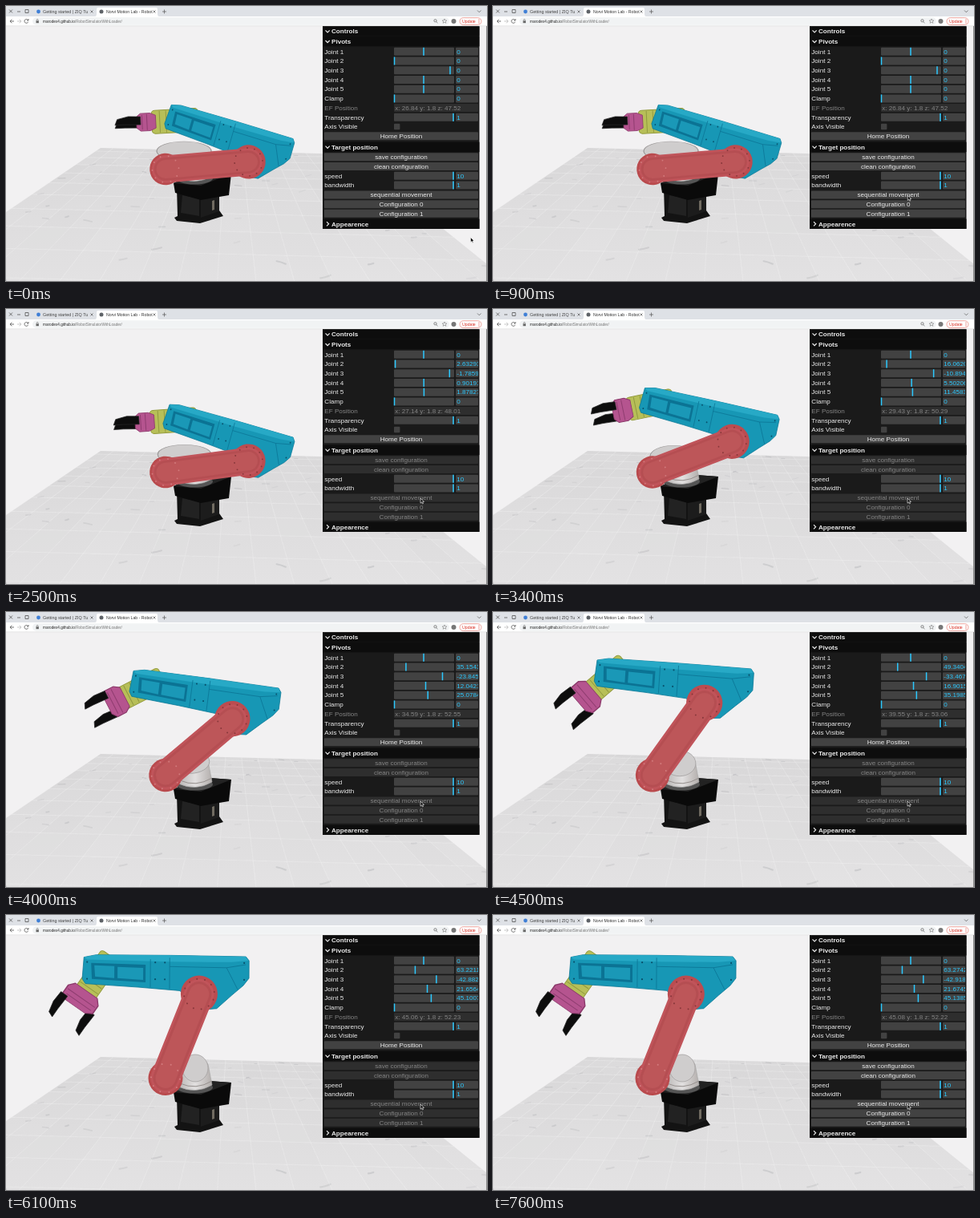
Recreate the animation shown at these times as an HTML page. Size 600 by 343 pixels, loop 7.7 s.

```html
<!DOCTYPE html>
<html lang="en">
<head>
<meta charset="utf-8">
<title>Robot arm simulator</title>
<style>
html, body { margin: 0; width: 100%; height: 100%; overflow: hidden; background: #f2f1f2; }
svg { display: block; width: 600px; height: 343px; }
text { font-family: "Liberation Sans", Arial, sans-serif; white-space: pre; }
</style>
</head>
<body>
<svg id="stage" viewBox="0 0 600 343" xmlns="http://www.w3.org/2000/svg">
  <defs>
    <linearGradient id="ground" x1="0" y1="0" x2="0" y2="1">
      <stop offset="0" stop-color="#dbdadb"/><stop offset="1" stop-color="#e4e3e4"/>
    </linearGradient>
    <linearGradient id="metal">
      <stop offset="0" stop-color="#b9b6b5"/><stop offset=".5" stop-color="#e2e0e0"/><stop offset="1" stop-color="#b3aeac"/>
    </linearGradient>
    <clipPath id="floorClip"><path d="M0 257L118 177L430 185L600 322V343H0Z"/></clipPath>
    <clipPath id="numberClip"><rect x="561" y="40" width="28" height="240"/></clipPath>
  </defs>
</svg>
<script>
const stage = document.getElementById('stage');
const LOOP = 7700, MOVE_START = 1412, MOVE_TIME = 4984, MAX_ANGLE = 63.2742;

function add(parent, tag, attrs, text) {
  const el = document.createElementNS('http://www.w3.org/2000/svg', tag);
  for (const key in attrs) el.setAttribute(key, attrs[key]);
  if (text !== undefined) el.textContent = text;
  parent.appendChild(el);
  return el;
}
const group = (parent, attrs = {}) => add(parent, 'g', attrs);
const rect = (parent, x, y, width, height, fill, more = {}) =>
  add(parent, 'rect', { x, y, width, height, fill, ...more });
const path = (parent, d, fill, more = {}) => add(parent, 'path', { d, fill, ...more });
const line = (parent, d, stroke, width, more = {}) =>
  path(parent, d, 'none', { stroke, 'stroke-width': width, ...more });
const circle = (parent, cx, cy, r, fill, more = {}) =>
  add(parent, 'circle', { cx, cy, r, fill, ...more });
const ellipse = (parent, cx, cy, rx, ry, fill, more = {}) =>
  add(parent, 'ellipse', { cx, cy, rx, ry, fill, ...more });
const label = (parent, x, y, text, size, fill, more = {}) =>
  add(parent, 'text', { x, y, 'font-size': size, fill, ...more }, text);
const place = (el, transform) => el.setAttribute('transform', transform);

function seededRandom(seed) {
  return () => (seed = (seed * 16807) % 2147483647) / 2147483647;
}

function drawFloor() {
  rect(stage, 0, 25, 600, 318, '#f2f1f2');
  const floor = group(stage, { 'clip-path': 'url(#floorClip)' });
  rect(floor, 0, 170, 600, 173, 'url(#ground)');
  const random = seededRandom(41), columns = 16, step = 312 / columns, depth = 0.06;
  const project = (u, z) => [281 + u / z, 66 + 112 / z + u / z * 0.025];
  for (let i = 0; i < 12; i++) {
    for (let j = -1; j <= columns; j++) {
      const u = -163 + j * step, z = 1 - i * depth;
      const corners = [project(u, z), project(u + step, z),
        project(u + step, z - depth), project(u, z - depth)];
      path(floor, 'M' + corners.join('L') + 'Z', `rgba(110,110,115,${0.03 * random()})`,
        { stroke: 'rgba(245,245,245,.3)', 'stroke-width': 0.5 });
      if (random() < 0.35) {
        const [x, y] = project(u + step * random(), z - depth * random());
        const size = (2 + 5 * random()) / z, tilt = (random() - 0.5) * size;
        line(floor, `M${x} ${y}q${size * 0.4} ${tilt * 0.1} ${size} ${tilt * 0.7}`,
          `rgba(105,108,115,${0.05 + random() * 0.13})`, 1 / z, { 'stroke-linecap': 'round' });
      }
    }
  }
}

function drawBrowser() {
  rect(stage, 0, 0, 600, 14, '#dee1e6');
  rect(stage, 0, 13, 600, 12, '#fff');
  rect(stage, 0, 24.6, 600, 0.6, '#d5d5d5');
  path(stage, 'M110 13.5Q113 13 113 10V4Q113 2 115 2H187Q189 2 189 4V10Q189 13 192 13.5Z', '#fff');
  line(stage, 'M4 4.5l4 4m0-4l-4 4M14 7h4M24 4.5h4v4h-4z', '#555', 0.8);
  line(stage, 'M105.5 5.5l3 3m0-3l-3 3M183.5 5.5l3 3m0-3l-3 3M195 7h5M197.5 4.5v5M588 5.5l2.3 2.3 2.3-2.3', '#555', 0.7);
  circle(stage, 40.5, 7, 2.4, '#3f7fd6');
  circle(stage, 119, 7, 2.5, '#5f6368');
  label(stage, 46, 9.2, 'Getting started | ZIQ Tu', 5.4, '#444');
  label(stage, 125, 9.2, 'Norvi Motion Lab - Robot', 5.2, '#333');
  line(stage, 'M10 19H5m2.3-2.3L5 19l2.3 2.3', '#555', 0.8);
  line(stage, 'M14 19h5m-2.3-2.3L19 19l-2.3 2.3', '#bbb', 0.8);
  line(stage, 'M27.5 17.7a2.4 2.4 0 1 0 .2 2M28 16v2h-2', '#555', 0.8);
  rect(stage, 33, 14.3, 520, 9.4, '#f1f3f4', { rx: 4.7 });
  rect(stage, 37.5, 18.4, 3.4, 2.8, '#666');
  line(stage, 'M38.2 18.5v-1a1 1 0 0 1 2 0v1', '#666', 0.6);
  const url = label(stage, 46, 20.5, '', 4.7, '#777');
  add(url, 'tspan', { fill: '#222' }, 'marodex4.github.io');
  add(url, 'tspan', {}, '/RobotSimulatorWithLoader/');
  circle(stage, 535.5, 18.3, 1.6, 'none', { stroke: '#555', 'stroke-width': 0.7 });
  line(stage, 'M536.7 19.5l1.7 1.7', '#555', 0.7);
  line(stage, 'M547 16l.9 2h2l-1.6 1.3.6 2-1.9-1.2-1.9 1.2.6-2-1.6-1.3h2z', '#666', 0.5);
  circle(stage, 558.5, 19, 3, '#777');
  rect(stage, 566, 14.7, 27, 8.8, '#fff', { rx: 4.4, stroke: '#e0685f', 'stroke-width': 0.6 });
  label(stage, 569, 20.9, 'Update', 5.2, '#d93025');
  [17, 19, 21].forEach(y => circle(stage, 590, y, 0.6, '#d93025'));
  rect(stage, 599, 25, 1, 318, '#8b8b8b');
}

function boltRing(parent, cx, cy, r, count, fill) {
  for (let i = 0; i < count; i++) {
    const a = i / count * Math.PI * 2;
    circle(parent, cx + r * Math.cos(a), cy + r * Math.sin(a), 1, fill);
  }
}

function drawBase() {
  path(stage, 'M213 226L214 262L210 264L213 268L242 271L271 262L266 255V226Z', '#131313');
  path(stage, 'M220 236L241 240V262L218 258Z', '#222');
  path(stage, 'M243 240L266 234V256L243 264Z', '#1c1c1c');
  path(stage, 'M257 243l3-1v12l-3 1z', '#706b61');
  path(stage, 'M209 221L241 206L281 209L278 236L243 242L211 233Z', '#0a0a0a');
  path(stage, 'M209 221L241 206L281 209L243 224Z', '#222');
  ellipse(stage, 235, 215, 23, 7.5, '#555');
  path(stage, 'M215 214Q218 186 229 177Q243 171 252 186L257 212Q237 224 215 214Z', 'url(#metal)',
    { stroke: '#aaa', 'stroke-width': 0.7 });
  line(stage, 'M217 210Q237 219 257 207M228 186Q240 178 250 190', '#96908e', 1);
}

// Motor housing that turns out of sight behind the lower arm.
function drawHousing() {
  const body = ellipse(stage, 0, 0, 1, 1, '#cfcdcd', { stroke: '#9d9a9a', 'stroke-width': 0.04 });
  return s => place(body, `translate(${222 + 14 * s} ${181 + 10 * s}) scale(${34 - 18 * s} ${12 + 5 * s})`);
}

// The hand points to -x from the wrist; rolling spreads palm and fingers apart.
function drawHand() {
  const hand = group(stage), fingerShape = 'M-50 -5L-65 -6L-79 -3L-82 4L-70 4L-50 5Z';
  const finger = () => path(hand, fingerShape, '#0d0d0d', { stroke: '#262626', 'stroke-width': 0.7 });
  const far = finger();
  rect(hand, -36, -14, 58, 29, '#b7bf58', { rx: 4, stroke: '#939b3e' });
  line(hand, 'M-18 -13V14M-26 -13V14M-10 -13V14', '#919940', 1);
  const palm = path(hand, 'M-31 -8L-38 -11H-50L-55 -7V7L-50 11H-38L-31 8Z', '#b5548f',
    { stroke: '#8c3a6b', 'stroke-width': 0.8 });
  const ridge = line(hand, 'M-42 -10V10M-48 -9V9', '#8f3d70', 1);
  const near = finger();
  return ({ x, y }, pitch, roll) => {
    place(hand, `translate(${x} ${y}) rotate(${-pitch})`);
    const spread = 2 + 26 * roll, width = 1 + 1.5 * roll;
    place(far, `translate(0 ${spread})`);
    place(near, `translate(0 ${-spread})`);
    [palm, ridge].forEach(el => place(el, `scale(1 ${width})`));
  };
}

// Upper arm, drawn around the elbow at the origin.
function drawUpperArm() {
  const arm = group(stage), dark = '#0b7394';
  path(arm, 'M-144 -45L-129 -48H-36L58 -47L62 -42V-20L55 -11L41 1L22 18L-2 20L-24 -4L-76 -8L-142 -12L-146 -18Z',
    '#1797b5', { stroke: '#0c7896', 'stroke-width': 0.8, 'stroke-linejoin': 'round' });
  path(arm, 'M-144 -45L-129 -48H-36L58 -47L61 -42L40 -40H-36L-140 -42Z', '#27a9c6');
  path(arm, 'M-135 -38L-67 -36V-14L-134 -18Z', dark);
  path(arm, 'M-131 -35L-106 -34V-19L-130 -21ZM-102 -33L-70 -32V-17L-102 -19Z', '#1a98b7');
  line(arm, 'M-61 -43V-8M-37 -45V-6M-37 -34L34 -33L58 -37M34 -33L48 -6', dark, 0.8);
  for (const x of [-140, -55, -43, 56])
    for (const y of [-39, -18]) circle(arm, x, y, 1.1, '#08516c');
  return ({ x, y }, tilt, sx, sy) =>
    place(arm, `translate(${x} ${y}) rotate(${tilt}) scale(${sx} ${sy})`);
}

// Lower arm, drawn from the shoulder at the origin along +x.
function drawLowerArm(length) {
  const arm = group(stage), spine = `M0 0H${length}`, round = { 'stroke-linecap': 'round' };
  circle(arm, 0, 0, 21.5, '#b94a4d');
  circle(arm, length, 0, 23, '#bb4c50');
  line(arm, spine, '#c0545a', 37, round);
  line(arm, spine, '#b54e52', 31, round);
  line(arm, spine, '#bd5659', 25, round);
  boltRing(arm, length, 0, 19, 12, '#87373a');
  boltRing(arm, 0, 0, 18, 10, '#d27b7d');
  return ({ x, y }, angle, scale) =>
    place(arm, `translate(${x} ${y}) rotate(${-angle}) scale(${scale})`);
}

const SHOULDER = { x: 199, y: 203.5 }, ARM_LENGTH = 113;
const radians = degrees => degrees * Math.PI / 180;

function drawRobot() {
  drawBase();
  const poseHousing = drawHousing(), poseHand = drawHand();
  const poseUpper = drawUpperArm(), poseLower = drawLowerArm(ARM_LENGTH);
  return angle => {
    const s = angle / MAX_ANGLE;
    const lift = angle + 5, scale = 0.92 + 0.08 * s;
    const elbow = {
      x: SHOULDER.x + ARM_LENGTH * scale * Math.cos(radians(lift)),
      y: SHOULDER.y - ARM_LENGTH * scale * Math.sin(radians(lift))
    };
    const tilt = 16.2 - 0.25 * angle, sx = 0.78 + 0.22 * s, sy = 0.92 + 0.08 * s;
    const cos = Math.cos(radians(tilt)), sin = Math.sin(radians(tilt));
    const reach = -123 * sx, rise = -28.5 * sy;
    const wrist = { x: elbow.x + reach * cos - rise * sin, y: elbow.y + reach * sin + rise * cos };
    poseHousing(s);
    poseLower(SHOULDER, lift, scale);
    poseUpper(elbow, tilt, sx, sy);
    poseHand(wrist, 3 + 52 * s ** 1.3, Math.sin(radians(0.713 * angle)));
  };
}

function drawPanel() {
  const panel = group(stage), numbers = {}, handles = {};
  const rowY = i => 56.8 + i * 11.72;
  const gray = '#424242', ink = '#ebebeb', cyan = '#2cc9ff', size = 8.1;
  rect(panel, 395, 25.3, 195.5, 252.5, '#1a1a1a');
  const title = (y, text, open = true) => {
    rect(panel, 395, y - 6.2, 195.5, 12.4, '#0d0d0d');
    line(panel, open ? `M398.5 ${y - 1.2}l2.6 2.6 2.6-2.6` : `M400 ${y - 2.6}l2.6 2.6-2.6 2.6`, ink, 1.2);
    label(panel, 406, y + 2.8, text, size, ink, { 'font-weight': 'bold' });
  };
  const field = (parent, x, y, width) => rect(parent, x, y - 5, width, 10, gray, { rx: 1 });
  const slider = (y, name, x, value) => {
    label(panel, 397.3, y + 2.8, name, size, ink);
    field(panel, 484, y, 75);
    field(panel, 561, y, 28);
    handles[name] = rect(panel, x - 0.75, y - 5, 1.5, 10, cyan);
    numbers[name] = label(panel, 562.3, y + 2.8, value, size, cyan, { 'clip-path': 'url(#numberClip)' });
  };
  const button = (parent, y, text) => {
    field(parent, 397, y, 192);
    label(parent, 493, y + 2.7, text, size, ink, { 'text-anchor': 'middle' });
  };

  title(31.5, 'Controls');
  title(44.2, 'Pivots');
  [521, 484.5, 554, 521, 521].forEach((x, i) => slider(rowY(i), 'Joint ' + (i + 1), x, '0'));
  slider(rowY(5), 'Clamp', 484.5, '0');
  const info = group(panel, { opacity: 0.5 });
  label(info, 397.3, rowY(6) + 2.8, 'EF Position', size, ink);
  field(info, 484, rowY(6), 105);
  const position = label(info, 485.3, rowY(6) + 2.8, '', size, ink);
  slider(rowY(7), 'Transparency', 558, '1');
  label(panel, 397.3, rowY(8) + 2.8, 'Axis Visible', size, ink);
  rect(panel, 484, rowY(8) - 3.7, 7.4, 7.4, gray, { rx: 1 });
  button(panel, rowY(9), 'Home Position');
  title(175.9, 'Target position');
  const actions = group(panel);
  ['save configuration', 'clean configuration'].forEach((text, i) => button(actions, rowY(11.22 + i), text));
  slider(rowY(13.22), 'speed', 558, '10');
  slider(rowY(14.22), 'bandwidth', 558, '1');
  ['sequential movement', 'Configuration 0', 'Configuration 1'].forEach((text, i) =>
    button(actions, rowY(15.24 + i), text));
  title(271.8, 'Appearence', false);

  // Per joint: share of the angle, handle origin, pixels per degree.
  const joints = { 'Joint 2': [1, 484.5, 0.41], 'Joint 3': [-0.6783, 554, 0.4],
    'Joint 4': [0.34255, 521, 0.2083], 'Joint 5': [0.71338, 521, 0.2083] };
  return (angle, busy) => {
    for (const name in joints) {
      const [share, origin, scale] = joints[name], value = angle * share;
      handles[name].setAttribute('x', origin + value * scale - 0.75);
      numbers[name].textContent = value ? value.toFixed(6).slice(0, 8) : '0';
    }
    const a = angle - 15.87, b = a * (angle - 49.8);
    const x = 26.84 + angle * (0.1606 + 0.00289 * a - 0.0000145 * b);
    const z = 47.52 + angle * (0.1726 - 0.001814 * a - 0.0000193 * b);
    position.textContent = `x: ${+x.toFixed(2)} y: 1.8 z: ${+z.toFixed(2)}`;
    actions.setAttribute('opacity', busy ? 0.5 : 1);
  };
}

drawFloor();
drawBrowser();
const poseRobot = drawRobot(), updatePanel = drawPanel();
const cursor = path(stage, 'M0 0V6.2L1.5 4.9L2.5 7L3.5 6.5L2.6 4.5L4.5 4.4Z', '#111',
  { stroke: '#fff', 'stroke-width': 0.6 });

const clamp = x => Math.min(1, Math.max(0, x));
const easeInOutCubic = u => u < 0.5 ? 4 * u ** 3 : 1 - 4 * (1 - u) ** 3;

function render(time) {
  const t = Math.floor(time % LOOP / 100) * 100;
  const u = clamp((t - MOVE_START) / MOVE_TIME);
  const angle = MAX_ANGLE * easeInOutCubic(u);
  poseRobot(angle);
  updatePanel(angle, t >= 1400 && u < 1);
  const travel = easeInOutCubic(clamp((t - 50) / 950));
  place(cursor, `translate(${579.5 - 62.5 * travel} ${288.5 - 52.5 * travel})`);
}

const start = performance.now();
function tick() {
  render(performance.now() - start);
  requestAnimationFrame(tick);
}
tick();
</script>
</body>
</html>
```
